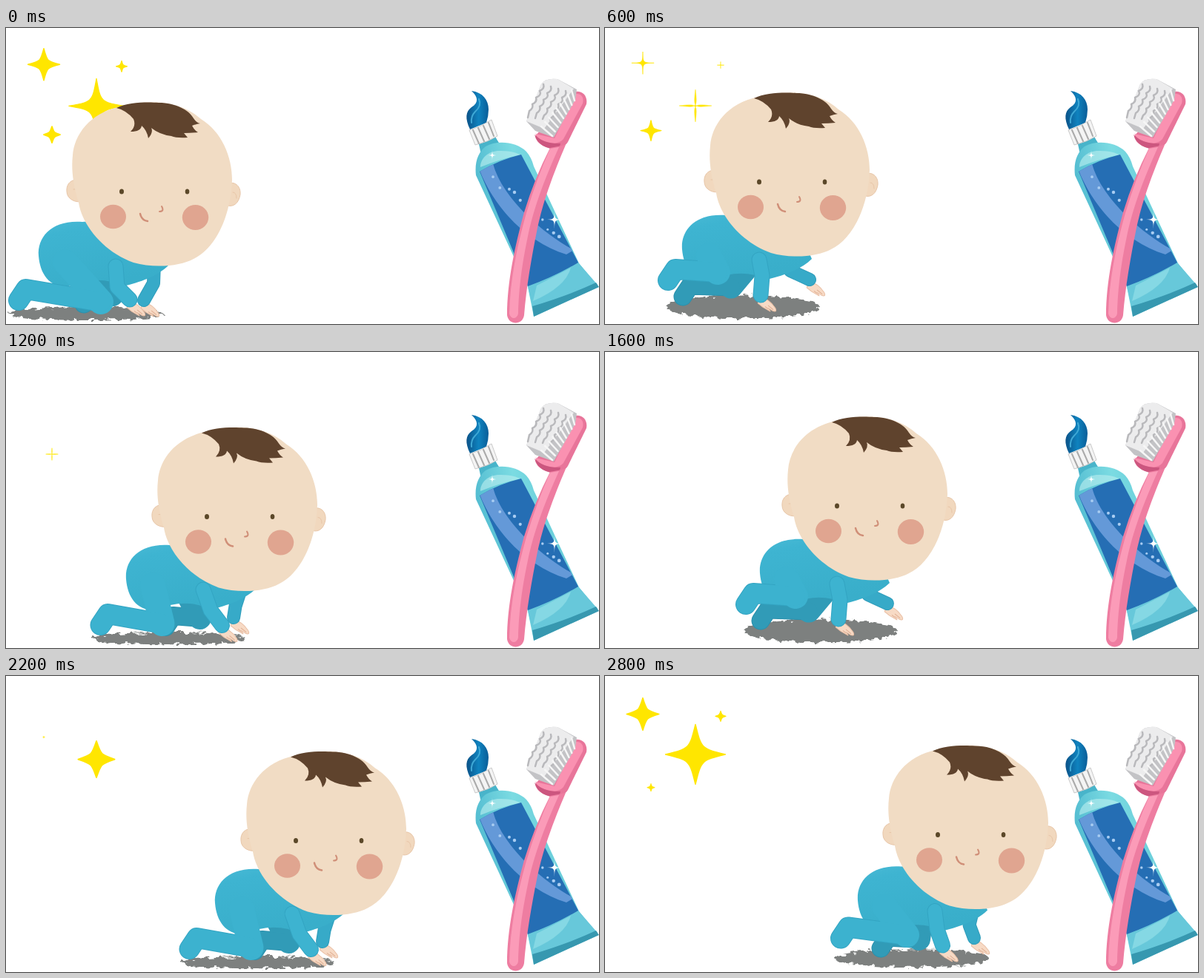
Recreate the animation shown at these times as an HTML page. Size 800 px wide and 400 px high, loop 3 s.

```html
<!DOCTYPE html>
<html lang="en">
<head>
<meta charset="utf-8">
<title>Crawling baby</title>
<style>
  html, body { margin: 0; width: 100%; height: 100%; overflow: hidden; background: #fff; }
  svg { display: block; width: 100vw; height: 100vh; }
  .line { fill: none; stroke-linecap: round; stroke-linejoin: round; }
</style>
</head>
<body>
<svg viewBox="0 0 800 400">
  <defs>
    <filter id="rough" x="-10%" y="-40%" width="120%" height="180%">
      <feTurbulence type="fractalNoise" baseFrequency=".12 .2" numOctaves="2" seed="4"/>
      <feDisplacementMap in="SourceGraphic" scale="11"/>
    </filter>
    <linearGradient id="tube" x1="0" y1=".3" x2="1" y2="0">
      <stop offset="0" stop-color="#4fb9cf"/><stop offset=".35" stop-color="#7bdbe2"/><stop offset="1" stop-color="#4db8cd"/>
    </linearGradient>
    <linearGradient id="paste">
      <stop offset="0" stop-color="#0b5288"/><stop offset=".55" stop-color="#0f83bf"/><stop offset="1" stop-color="#0a5d98"/>
    </linearGradient>
    <linearGradient id="suit" x1="0" y1="0" x2=".4" y2="1">
      <stop offset="0" stop-color="#4cbbd6"/><stop offset=".25" stop-color="#3eb4d1"/><stop offset="1" stop-color="#39aeca"/>
    </linearGradient>
    <clipPath id="labelClip"><path d="M639,194Q665,178 695,171L772,317Q738,337 704,349Z"/></clipPath>

    <path id="torso" fill="url(#suit)" d="M103,262C62,259 42,282 44,308C46,332 58,350 82,350Q125,332 158,349C180,344 205,335 219,321L190,255Z"/>

    <g id="head">
      <g fill="#f1d8be" stroke="#e8c6a8">
        <path d="M99,206C88,203 81,211 82,221C82,231 94,237 103,234Z"/>
        <path d="M300,210C310,207 317,215 316,225C314,237 307,242 299,240Z"/>
        <path class="line" d="M91,218Q96,217 99,222M306,222Q311,222 311,230"/>
      </g>
      <path fill="#f1dcc4" d="M98,236C90,210 88,190 90,172C92,145 112,115 155,106C200,94 239,101 263,123C291,140 305,174 305,205C303,260 279,300 253,312C235,322 200,325 172,317C133,303 103,268 98,236Z"/>
      <path fill="#5f432d" d="M149,108C165,100 190,100 206,101C229,101 247,111 253,122Q257,128 262,129Q256,130 251,132Q254,138 259,141Q249,142 240,142L245,148Q230,149 223,146Q207,144 196,135Q199,141 192,149Q190,138 183,132Q182,140 168,140Q176,132 172,123Q162,111 149,108Z"/>
      <g fill="#5b4829">
        <ellipse cx="156" cy="221" rx="3" ry="3.6"/><ellipse cx="244.5" cy="221" rx="2.8" ry="3.6"/>
      </g>
      <g fill="#e0a590">
        <ellipse cx="144.5" cy="255" rx="17.5" ry="16.3"/><ellipse cx="255.500" cy="256" rx="17.700" ry="17"/>
      </g>
      <g class="line" stroke="#d08f78" stroke-width="2.5">
        <path d="M181,251Q183,260 191,261"/><path stroke-width="2" d="M210,241Q214,248 207,248"/>
      </g>
    </g>
  </defs>

  <g id="stars" fill="#ffe600" stroke="#ffe600" stroke-linejoin="round"></g>
  <g id="baby"></g>

  <g id="toothpaste">
    <path fill="url(#paste)" d="M628,85C643,87 651,97 651,110Q651,119 648,128L626,137C619,122 620,113 628,107C638,101 637,93 628,85Z"/>
    <path class="line" stroke="#3fa9d6" stroke-width="2" d="M638,96Q642,105 633,113Q627,119 628,128"/>
    <path fill="#48b4ca" d="M638,157L660,147L668,160L641,171Z"/>
    <path fill="url(#tube)" d="M634,199C632,181 637,168 647,160C663,151 689,154 702,167Q709,175 712,187L773,318L799,350L712,390L704,350Z"/>
    <path fill="#b5edef" opacity=".65" d="M640,188C640,175 652,165 668,166C681,166 689,169 694,171Q664,178 640,188Z"/>
    <path fill="#67c8da" d="M704,349Q738,337 772,317L798,347L711,380Z"/>
    <path fill="#85d8e4" d="M716,348L762,324Q755,350 711,369Z"/>
    <path fill="#3798b0" d="M710,376Q760,361 796,344L800,350L712,390Z"/>
    <g clip-path="url(#labelClip)">
      <path fill="#256eb4" d="M630,160H780V360H630Z"/>
      <path fill="#6499d8" d="M638,190L657,183C668,227 722,277 766,300L756,306C705,290 660,247 638,190Z"/>
      <g id="specks" fill="#a9cdf2"></g>
    </g>
    <path fill="#f4f4f4" stroke="#c9c9c9" d="M625,138Q640,134 655,124L663,146Q650,154 633,158Z"/>
    <path class="line" stroke="#aaa" stroke-width="2" d="M630,138L638,156M637,135L645,153M644,132L652,150M651,128L658,146"/>
    <path id="glints" fill="#fff"/>
  </g>

  <g id="brush">
    <path fill="#e8759a" d="M767,86C778,84 785,92 783,103L758,154C750,169 716,163 714,146Z"/>
    <path fill="#fa91b1" d="M769,89C777,88 780,95 778,102L752,150C744,160 721,156 714,143L740,149Z"/>
    <path fill="#cc567f" d="M713,144Q725,157 748,156L746,164Q719,164 713,144Z"/>
    <path fill="#ee7da1" d="M734,162L755,158C735,205 724,238 717,270C709,310 702,350 699,388C697,402 678,402 676,388C676,340 688,290 699,249Q713,203 734,162Z"/>
    <path fill="#fb9bb8" d="M734,163L746,161C726,205 713,242 706,272C696,318 692,350 691,386C689,394 681,394 679,386C680,340 690,292 702,250Q716,203 734,163Z"/>
    <path fill="#c3c3c6" d="M702,126L722,76Q728,67 744,69L770,83L768,97L739,148L714,139Z"/>
    <path fill="#ececed" d="M702,126L722,76Q728,67 744,69L766,82L726,136Z"/>
    <g id="waves" class="line" stroke="#b9b9bc" stroke-width="2.5"></g>
    <g id="bristles" class="line" stroke="#f6f6f6" stroke-width="2.5"></g>
  </g>
</svg>
<script>
const STEP = 200, STEPS = 15, CYCLE = 5;
const byId = id => document.getElementById(id);
const range = n => [...Array(n).keys()];
const mix = (a, b, t) => a + (b - a) * t;
const mixPoints = (a, b, t) => a.map((v, i) => mix(v, b[i], t));
const add = (p, dx, dy) => [p[0] + dx, p[1] + dy];

function random(seed) {
  return () => (seed = seed * 16807 % 2147483647) / 2147483647;
}

// Key poses of the crawl: head lift, body shift, then [joint, end] of each limb.
const kneel = { lift: [0], shift: [0, 0], nearLeg: [128, 370, 27, 353], farLeg: [143, 361, 115, 358],
                nearArm: [150, 350, 167, 367], farArm: [199, 345, 186, 368] };
const push = { lift: [3], shift: [6, -2], nearLeg: [63, 364, 18, 355], farLeg: [150, 358, 106, 355],
               nearArm: [172, 348, 186, 372], farArm: [190, 342, 198, 350] };
const reach = { lift: [-13], shift: [8, -9], nearLeg: [100, 330, 43, 326], farLeg: [118, 350, 63, 348],
                nearArm: [160, 335, 158, 361], farArm: [198, 328, 224, 340] };

const blend = (a, b) => Object.fromEntries(
  Object.keys(a).map(key => [key, mixPoints(a[key], b[key], .5)]));
const poses = [kneel, blend(kneel, push), push, reach, blend(reach, kneel)];

const line = (points, width, color) =>
  `<path class="line" d="M${points.join('L')}" stroke="${color}" stroke-width="${width}"/>`;

function leg(hip, [kx, ky, ax, ay], width, color, edge) {
  const shin = [[kx, ky], [ax, ay], [ax - 10, ay + 15]];
  return line(shin, width + 2, edge) + line([hip, [kx, ky]], width + 8, color) + line(shin, width, color);
}

function arm(shoulder, [ex, ey, wx, wy], width, color, edge) {
  const joints = [shoulder, [ex, ey], [wx, wy]];
  return `<g transform="translate(${wx + 8} ${wy + 12}) rotate(25)">
      <path fill="#f7dac5" stroke="#e9bfa5" d="M-14,-5Q0,-8 13,0Q18,4 12,5L4,4L9,7L-3,6L-11,4Z"/>
      <path class="line" stroke="#dfae93" d="M3,1L11,3M0,4L4,5"/>
    </g>` + line(joints, width + 2, edge) + line(joints, width, color);
}

function drawPose({ lift: [lift], shift: [dx, dy], nearLeg, farLeg, nearArm, farArm }) {
  const at = (x, y) => [x + dx, y + dy];
  return `<g>
    <ellipse cx="${108 - 2 * lift}" cy="${386 + .7 * lift}" rx="104" ry="${9 - .5 * lift}"
      fill="#7d807f" filter="url(#rough)"/>` +
    arm(at(200, 318), farArm, 16, '#37aac8', '#2f9dbb') +
    leg(at(130, 335), farLeg, 23, '#319bb7', '#2b90ac') +
    `<use href="#torso" x="${dx}" y="${dy}"/>` +
    leg(at(80, 316), nearLeg, 26, '#3cb2cf', '#33a4c2') +
    arm(at(148, 322), nearArm, 19, '#3db3d0', '#33a4c2') +
    `<use href="#head" y="${lift}"/></g>`;
}

const baby = byId('baby');
baby.innerHTML = poses.map(drawPose).join('');

// Distance crawled at a few steps, linear in between.
const travelKeys = [[0, 0], [3, 52], [8, 157], [12, 261], [14, 293]];
function travel(step) {
  const next = Math.max(1, travelKeys.findIndex(([s]) => s >= step));
  const [s0, x0] = travelKeys[next - 1], [s1, x1] = travelKeys[next];
  return mix(x0, x1, (step - s0) / (s1 - s0));
}

const stars = [
  { x: 51, y: 47, size: 22, rise: 40, born: 10.83, rate: 1 },
  { x: 156, y: 50, size: 7.5, rise: 28, born: 11.85, rate: 1.25 },
  { x: 122, y: 105, size: 42, rise: 20, born: 9.6, rate: 1 },
  { x: 62, y: 138, size: 15, rise: 22, born: 13.24, rate: 1.05 }
];
const GROWTH = 3.5, LIFE = 9;

function starPath(x, y, r, waist) {
  const k = r * waist;
  const arc = (cx, cy, dx, dy) => `C${x + cx},${y + cy} ${x + cx},${y + cy} ${x + dx},${y + dy}`;
  return `M${x},${y - r}` + arc(k, -k, r, 0) + arc(k, k, 0, r) + arc(-k, k, -r, 0) + arc(-k, -k, 0, -r) + 'Z';
}

// A star rises while it swells, then shrinks and thins to a cross.
function drawStar({ x, y, size, rise, born, rate }, step) {
  const age = (step - born + STEPS) % STEPS * rate;
  if (age > LIFE) return '';
  const grow = Math.sin(Math.min(1, age / GROWTH) * Math.PI / 2);
  const shrink = 1 - (Math.max(0, age - GROWTH) / 8) ** 1.5;
  const waist = .25 - .00063 * age ** 3;
  const r = size * grow * shrink;
  const stroke = Math.min(r / 6, .5 + 5 * Math.max(0, waist));
  return `<path d="${starPath(x, y + rise * .5 ** age, r, waist)}" stroke-width="${stroke}"/>`;
}

byId('glints').setAttribute('d', starPath(740, 259, 13, .02) + starPath(656, 172, 8, .02));

const rand = random(11);
byId('specks').innerHTML = range(12).map(i => {
  const t = i / 11, x = mix(657, 755, t) + 8 * rand(), y = mix(202, 292, t) + 16 * (rand() - .5);
  return `<circle cx="${x}" cy="${y}" r="${1.5 + rand()}"/>`;
}).join('');

byId('waves').innerHTML = range(4).map(i =>
  `<path d="M${725 + i * 10},${76 + i * 3}q2,6 -5,9q3,6 -5,9q2,6 -5,9q2,5 -4,9l-2,${9 - i * 2}"/>`).join('');
byId('bristles').innerHTML = range(9).map(i => {
  const t = i / 8;
  return line([[mix(763, 722, t), mix(84, 133, t)], [mix(767, 737, t), mix(98, 146, t)]], 2.5, '#f6f6f6');
}).join('');

let shown = -1;
function draw() {
  const step = Math.floor(performance.now() / STEP) % STEPS;
  if (step !== shown) {
    shown = step;
    baby.setAttribute('transform', `translate(${travel(step)} 0)`);
    [...baby.children].forEach((pose, i) =>
      pose.setAttribute('display', i === step % CYCLE ? 'inline' : 'none'));
    byId('stars').innerHTML = stars.map(star => drawStar(star, step)).join('');
  }
  requestAnimationFrame(draw);
}
draw();
</script>
</body>
</html>
```
